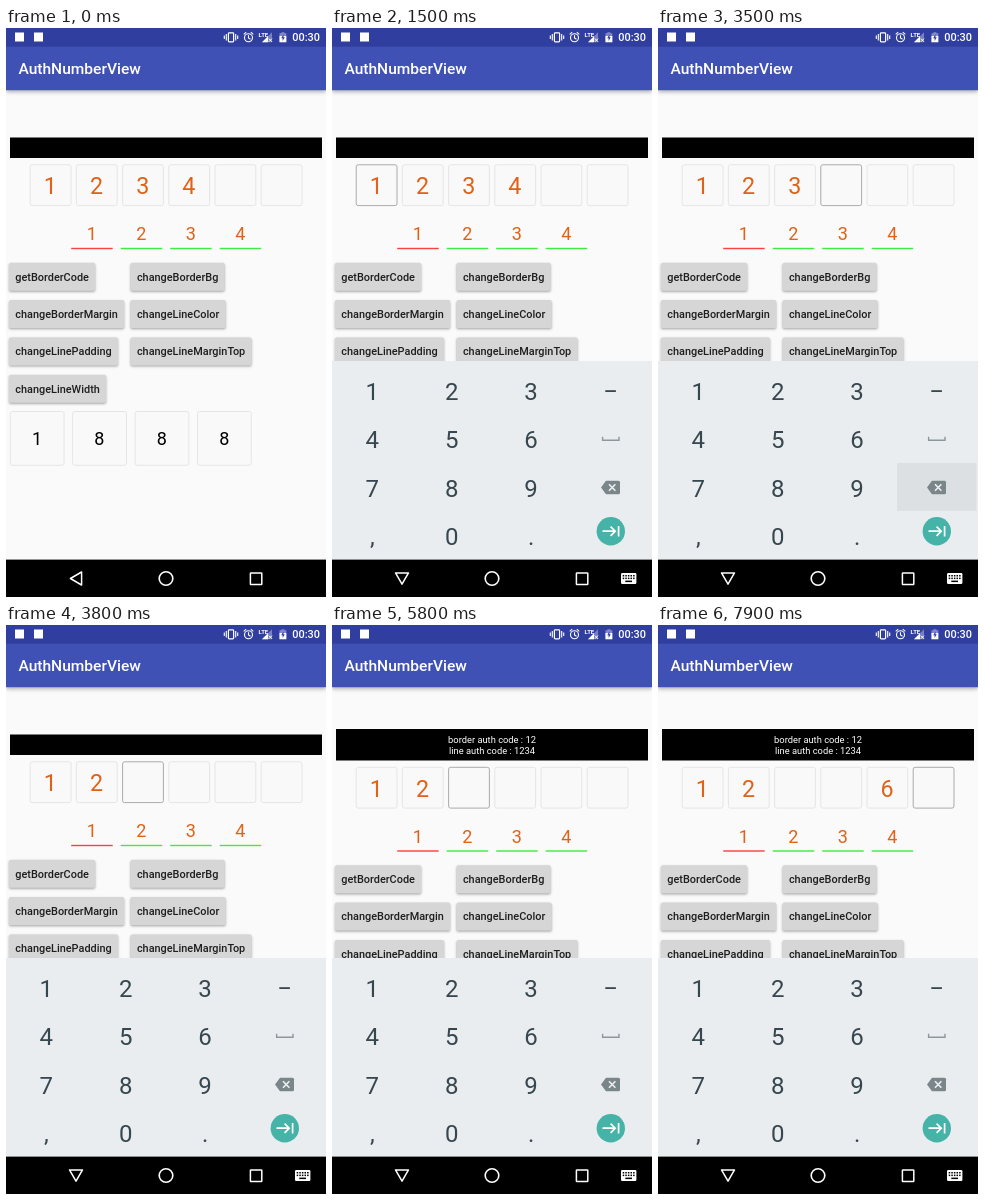
An HTML page with a canvas that plays this animation: 320 px wide and 569 px high, repeating every 8 s.

```html
<!DOCTYPE html>
<html>
<head>
<meta charset="utf-8">
<style>
  html, body { margin: 0; width: 100%; height: 100%; overflow: hidden; background: #fafafa; }
  canvas { display: block; width: 320px; height: 569px; }
</style>
</head>
<body>
<canvas id="stage"></canvas>
<script>
const LOOP = 8000, W = 320, H = 569;
const canvas = document.getElementById('stage');
const ratio = window.devicePixelRatio || 1;
canvas.width = W * ratio;
canvas.height = H * ratio;
const c = canvas.getContext('2d');

const clamp = v => Math.max(0, Math.min(1, v));
const ease = v => 1 - (1 - clamp(v)) ** 3;

function rect(x, y, w, h, fill) {
  c.fillStyle = fill;
  c.fillRect(x, y, w, h);
}

function rounded(x, y, w, h, r, fill, stroke, width = 0.8) {
  c.beginPath();
  c.roundRect(x, y, w, h, r);
  if (fill) { c.fillStyle = fill; c.fill(); }
  if (stroke) { c.strokeStyle = stroke; c.lineWidth = width; c.stroke(); }
}

function disc(x, y, r, fill) {
  c.beginPath();
  c.arc(x, y, r, 0, 7);
  c.fillStyle = fill;
  c.fill();
}

function path(d, fill, stroke, width = 1) {
  const p = new Path2D(d);
  if (fill) { c.fillStyle = fill; c.fill(p); }
  if (stroke) { c.strokeStyle = stroke; c.lineWidth = width; c.stroke(p); }
}

function text(s, x, y, size, color, align = 'center', weight = 400) {
  c.font = `${weight} ${size}px Roboto, sans-serif`;
  c.textAlign = align;
  c.fillStyle = color;
  c.fillText(s, x, y);
}

function withShadow(blur, dy, alpha, draw) {
  c.save();
  c.shadowColor = `rgba(0,0,0,${alpha})`;
  c.shadowBlur = blur * ratio;
  c.shadowOffsetY = dy * ratio;
  draw();
  c.restore();
}

function drawBars() {
  withShadow(4, 2, 0.3, () => rect(0, 0, W, 62.2, '#3f51b5'));
  rect(0, 0, W, 18.7, '#303f9f');
  text('AuthNumberView', 12.4, 46.3, 15.56, '#fff', 'left', 500);

  rect(9, 4.5, 9, 9, '#fff');
  rect(28, 4.5, 9, 9, '#fff');
  // vibrate, alarm, signal, battery
  rounded(222.4, 4.8, 5.2, 9, 0.8, null, '#fff', 1.2);
  path('M220.3 6V12.6M218.3 7.5V11M229.7 6V12.6M231.7 7.5V11', null, '#fff', 1.1);
  path('M246.5 9.8a4 4 0 1 1-8 0a4 4 0 1 1 8 0M242.5 7.3V10l2 1.3M237.7 6.3l2.5-2.1M247.3 6.3l-2.5-2.1', null, '#fff', 1.1);
  text('LTE', 252.5, 8.6, 6, '#fff', 'left', 700);
  path('M256 14.2L266 4.2V14.2Z', 'rgba(255,255,255,.35)');
  path('M256 14.2L262 8.2V14.2Z', '#fff');
  path('M262.8 10.6l3.2 3.2M266 10.6l-3.2 3.2', null, '#fff', 1);
  path('M273.5 5.2H275.4V4.2H278.4V5.2H280.3V14.2H273.5Z', 'rgba(255,255,255,.4)');
  rect(273.5, 8, 6.8, 6.2, '#fff');
  path('M277.5 6.2L275.2 10.2H276.6V13L278.8 9.2H277.5Z', '#303f9f');
  text('00:30', 314, 13.2, 10.9, '#fff', 'right', 500);
}

function numberBox(x, y, size, focused) {
  rounded(x + 0.5, y + 0.5, size, size, 2, '#f9f9fa', focused ? '#a2a2a2' : '#e4e4e4', 0.9);
}

function button(label, x, y) {
  c.font = '500 10.9px Roboto, sans-serif';
  const w = c.measureText(label).width + 12.6;
  withShadow(2.5, 1.2, 0.32, () => rounded(x, y, w, 28, 1.6, '#d6d6d6'));
  text(label, x + 6.3, y + 17.9, 10.9, '#1e1e1e', 'left', 500);
  return w;
}

function ripple(x, y, w, t) {
  const age = t - 5000;
  if (age < 0 || age > 800) return;
  c.save();
  c.beginPath();
  c.roundRect(x, y, w, 28, 1.6);
  c.clip();
  const alpha = 0.1 * clamp(age / 200) * clamp((800 - age) / 500);
  disc(x + w / 2, y + 14, 10 + 45 * ease(age / 400), `rgba(0,0,0,${alpha})`);
  c.restore();
}

function drawContent(t) {
  const shown = t >= 5000;
  const shift = shown ? 5.5 : 0;
  if (shown) {
    rect(4, 104, 312, 31.5, '#000');
    text('border auth code : 12', 160, 118.2, 9.33, '#fff');
    text('line auth code : 1234', 160, 129.2, 9.33, '#fff');
  } else {
    rect(4, 109.5, 312, 20.5, '#000');
  }

  c.save();
  c.translate(0, shift);
  const focus = t < 1000 ? -1 : t < 2600 ? 0 : t < 3700 ? 3 : t < 7000 ? 2 : t < 7800 ? 4 : 5;
  const digits = ['1', '2', t < 3700 ? '3' : '', t < 3400 ? '4' : '', t < 7800 ? '' : '6', ''];
  digits.forEach((d, i) => {
    const x = 23.7 + i * 46.2;
    numberBox(x, 136.3, 40.8, i === focus);
    text(d, x + 20.6, 166, 23.3, '#e06219');
  });

  for (let i = 0; i < 4; i++) {
    const x = 65.2 + i * 49.5;
    text(i + 1, x + 20.7, 212, 18, '#e06219');
    rect(x, 219.8, 41.5, 1.4, i ? '#41ea41' : '#f8423f');
  }

  const labels = ['getBorderCode', 'changeBorderBg', 'changeBorderMargin', 'changeLineColor',
    'changeLinePadding', 'changeLineMarginTop', 'changeLineWidth'];
  labels.forEach((label, i) => {
    const x = i % 2 ? 124.6 : 3, y = 234.7 + (i >> 1) * 37.35;
    const w = button(label, x, y);
    if (i === 0) ripple(x, y, w, t);
  });

  [...'1888'].forEach((d, i) => {
    const x = 3.8 + i * 62.4;
    numberBox(x, 383, 53.8, false);
    text(d, x + 27.2, 417.2, 18, '#000');
  });
  c.restore();
}

function drawKeyboard(t) {
  if (t < 1200) return;
  const enter = ease((t - 1200) / 250);
  c.save();
  c.beginPath();
  c.rect(0, 0, W, 531.6);
  c.clip();
  c.globalAlpha = enter;
  c.translate(0, 20 * (1 - enter));
  rect(0, 333, W, 199, '#eaedef');

  const deleting = t >= 3300 && t < 3600 || t >= 3700 && t < 3800;
  if (deleting) rect(239, 435, 79.5, 48, '#dde0e2');
  if (t >= 7700 && t < 7900) rect(159.5, 387, 79.5, 48, '#dde0e2');

  [...'123456789,0.'].forEach((key, i) => {
    text(key, 40.3 + i % 3 * 79.4, 371.6 + Math.floor(i / 3) * 48.5, 24, '#37474f');
  });
  rect(273.3, 362.2, 10.6, 1.8, '#37474f');
  path('M270.6 408.7V412.3H287V408.7', null, '#8d979c', 1.4);
  path('M269 459.5L274 452.8H286.5Q288 452.8 288 454.3V464.7Q288 466.2 286.5 466.2H274Z', '#7b868b');
  path('M277 456.2l6.4 6.6M283.4 456.2l-6.4 6.6', null, '#eceff1', 1.6);
  disc(278.8, 503.2, 14.2, '#45b3a7');
  path('M270.5 503.2H283M278.6 498.6L283.2 503.2L278.6 507.8M286.6 498V508.4', null, '#fff', 1.7);
  c.restore();
}

function drawNavigation(t) {
  rect(0, 531.6, W, 37.4, '#000');
  const open = clamp((t - 1000) / 200);
  c.save();
  c.translate(70, 550.5);
  c.rotate(-Math.PI / 2 * open);
  c.lineJoin = 'round';
  path('M-5.6 0L5.6 -6.5V6.5Z', null, '#fff', 1.5);
  c.restore();
  c.beginPath();
  c.arc(160, 550.5, 6.8, 0, 7);
  c.strokeStyle = '#fff';
  c.lineWidth = 1.6;
  c.stroke();
  rounded(244.4, 545, 11.4, 11.4, 0.5, null, '#fff', 1.5);

  c.globalAlpha = open;
  rounded(289, 545, 15.4, 11, 1.2, '#fff');
  for (let row = 0; row < 2; row++)
    for (let col = 0; col < 5; col++) rect(290.7 + col * 2.6, 547 + row * 2.6, 1.5, 1.5, '#000');
  rect(293.3, 552.6, 6.7, 1.5, '#000');
  c.globalAlpha = 1;
}

function frame(now) {
  const t = now % LOOP;
  c.setTransform(ratio, 0, 0, ratio, 0, 0);
  rect(0, 0, W, H, '#fafafa');
  drawBars();
  drawContent(t);
  drawKeyboard(t);
  drawNavigation(t);
  requestAnimationFrame(() => frame(performance.now()));
}
frame(performance.now());
</script>
</body>
</html>
```
